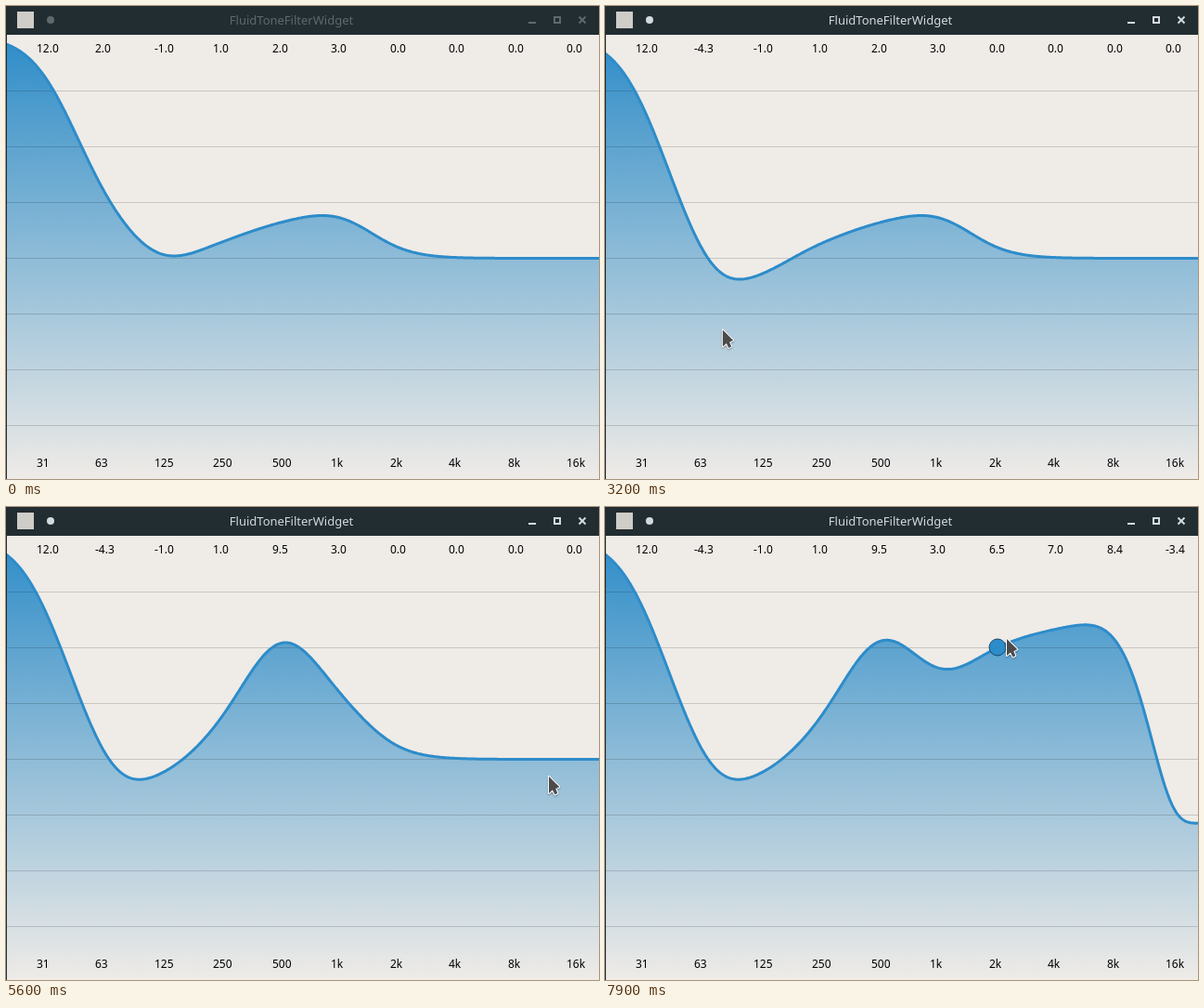
Recreate the animation shown at these times as an HTML page with a canvas. Size 639x509 px, loop 8 s.

```html
<!DOCTYPE html>
<html lang="en">
<head>
<meta charset="utf-8">
<title>Equalizer</title>
<style>
  html, body { margin: 0; width: 100%; height: 100%; overflow: hidden; background: #efebe7; }
  canvas { display: block; }
</style>
</head>
<body>
<canvas id="stage" width="639" height="509"></canvas>
<script>
const W = 639, H = 509, TOP = 31, DB = 20;
const ZERO = 271.5, POINTER_ZERO = 272, HANDLE_ZERO = 281;
const LOOP = 8000, STEP = 100, LAG = 15;
const BLUE = '#2d8cca';
const ctx = document.getElementById('stage').getContext('2d');

const START = [12, 2, -1, 1, 2, 3, 0, 0, 0, 0];
const NAMES = START.map((_, i) => i < 5 ? `${Math.floor(31.25 * 2 ** i + 0.5 * (i === 1))}` : `${2 ** (i - 5)}k`);
const bandX = i => 42 + 63.5 * i;

// Eased pointer moves: begin, end, x, y
const ENTRY = [13, 121];
const MOVES = [
  [700, 1100, 93, 158],
  [1400, 2300, 101, 217],
  [2300, 2400, 102, 274],
  [2600, 3000, 105, 358],
  [3100, 3600, 315, 266],
  [3800, 4673, 316, 82],
  [5000, 5600, 585, 290],
  [5900, 6600, 600, 436],
  [6700, 7223, 555, 104],
  [7250, 7570, 516, 104],
  [7575, 7740, 433, 142]
];
const DRAGS = [[1500, 3100], [3900, 4800], [6000, LOOP]];

function pointer(t) {
  let [x, y] = ENTRY;
  for (const [begin, end, toX, toY] of MOVES) {
    const k = Math.min(1, Math.max(0, (t - begin) / (end - begin)));
    const ease = k * k * (3 - 2 * k);
    x += (toX - x) * ease;
    y += (toY - y) * ease;
  }
  return [x, y];
}

const dragging = t => DRAGS.some(([a, b]) => t >= a && t <= b);

// Replays the drags so that the state depends on the time alone
function stateAt(time) {
  const gains = START.slice();
  let active = -1;
  for (let t = 0; t <= time; t += STEP) {
    active = -1;
    if (!dragging(t)) continue;
    const [x, y] = pointer(t - LAG);
    active = Math.floor(x / (W / 10));
    gains[active] = (POINTER_ZERO - y) / DB;
  }
  return { gains, active };
}

const warp = u => Math.tan(Math.PI * 31.25 * 2 ** u / 44100);

// Second-order high shelf, in dB; w4 is the fourth power of the frequency ratio
function shelf(gain, w4) {
  const a2 = 10 ** (gain / 20);
  return 10 * Math.log10(a2 * (a2 * w4 + 1) / (w4 + a2));
}

// The response is a cascade of shelves halfway between neighbouring bands
function response(x, gains) {
  const w = warp((x - 42) / 63.5);
  let g = gains[0];
  for (let i = 0; i < 9; i++) {
    g += shelf(gains[i + 1] - gains[i], (w / warp(i + 0.5)) ** 4);
  }
  return ZERO - DB * g;
}

function line(x1, y1, x2, y2) {
  ctx.beginPath();
  ctx.moveTo(x1, y1);
  ctx.lineTo(x2, y2);
  ctx.stroke();
}

function disc(x, y, r) {
  ctx.beginPath();
  ctx.arc(x, y, r, 0, 7);
  ctx.fill();
}

function titleBar(focused) {
  ctx.fillStyle = '#222d32';
  ctx.fillRect(0, 0, W, TOP);
  ctx.fillRect(0, 0, 1, H);
  ctx.fillStyle = '#cfcdc8';
  ctx.fillRect(12, 6, 18, 18);
  ctx.fillStyle = ctx.strokeStyle = focused ? '#d3dade' : '#5e696e';
  disc(48, 15, 4);
  ctx.font = '13px "Noto Sans", sans-serif';
  ctx.textAlign = 'center';
  ctx.fillText('FluidToneFilterWidget', 307.5, 20);
  ctx.fillRect(563, 17, 8, 2);
  ctx.lineWidth = 2;
  ctx.strokeRect(591, 12, 6, 6);
  line(617.5, 11.5, 624.5, 18.5);
  line(624.5, 11.5, 617.5, 18.5);
}

function plot(gains) {
  const curve = new Path2D();
  for (let x = 0; x <= W + 1; x++) curve.lineTo(x, response(x, gains));
  const area = new Path2D(curve);
  area.lineTo(W + 1, H);
  area.lineTo(0, H);
  area.closePath();

  const fade = ctx.createLinearGradient(0, TOP, 0, H);
  fade.addColorStop(0, 'rgba(45,140,200,1)');
  fade.addColorStop(1, 'rgba(45,140,200,0)');
  ctx.fillStyle = fade;
  ctx.fill(area);

  ctx.lineWidth = 1;
  ctx.strokeStyle = 'rgba(0,0,0,.16)';
  for (let y = 91.5; y < H; y += 60) line(0, y, W, y);

  ctx.lineWidth = 3;
  ctx.strokeStyle = BLUE;
  ctx.stroke(curve);

  ctx.fillStyle = '#000';
  ctx.font = '12px "Noto Sans", sans-serif';
  ctx.textAlign = 'left';
  NAMES.forEach((name, i) => {
    const x = Math.round(bandX(i) - 9.2);
    ctx.fillText(gains[i].toFixed(1), x, 50);
    ctx.fillText(name, x, 496);
  });
}

function handle(x, y) {
  ctx.fillStyle = BLUE;
  ctx.strokeStyle = '#15496c';
  ctx.lineWidth = 1;
  disc(x, y, 9);
  ctx.stroke();
}

const ARROW = new Path2D('M0 0V18L4 14.6L6.5 19.5L9.3 18L7.3 13.2L11.3 11.3Z');

function cursor(x, y) {
  ctx.save();
  ctx.translate(x, y);
  ctx.lineJoin = 'round';
  ctx.lineWidth = 2;
  ctx.strokeStyle = '#fff';
  ctx.shadowColor = 'rgba(0,0,0,.35)';
  ctx.shadowBlur = 2;
  ctx.shadowOffsetY = 1;
  ctx.stroke(ARROW);
  ctx.shadowColor = 'transparent';
  ctx.fillStyle = '#4b4b4b';
  ctx.fill(ARROW);
  ctx.restore();
}

function draw() {
  const t = Math.floor(performance.now() % LOOP / STEP) * STEP;
  const { gains, active } = stateAt(t);
  ctx.fillStyle = '#efebe7';
  ctx.fillRect(0, 0, W, H);
  plot(gains);
  titleBar(t >= 1300);
  if (active >= 0) handle(bandX(active), HANDLE_ZERO - DB * gains[active]);
  if (t >= 700) cursor(...pointer(t));
  requestAnimationFrame(draw);
}
draw();
</script>
</body>
</html>
```
